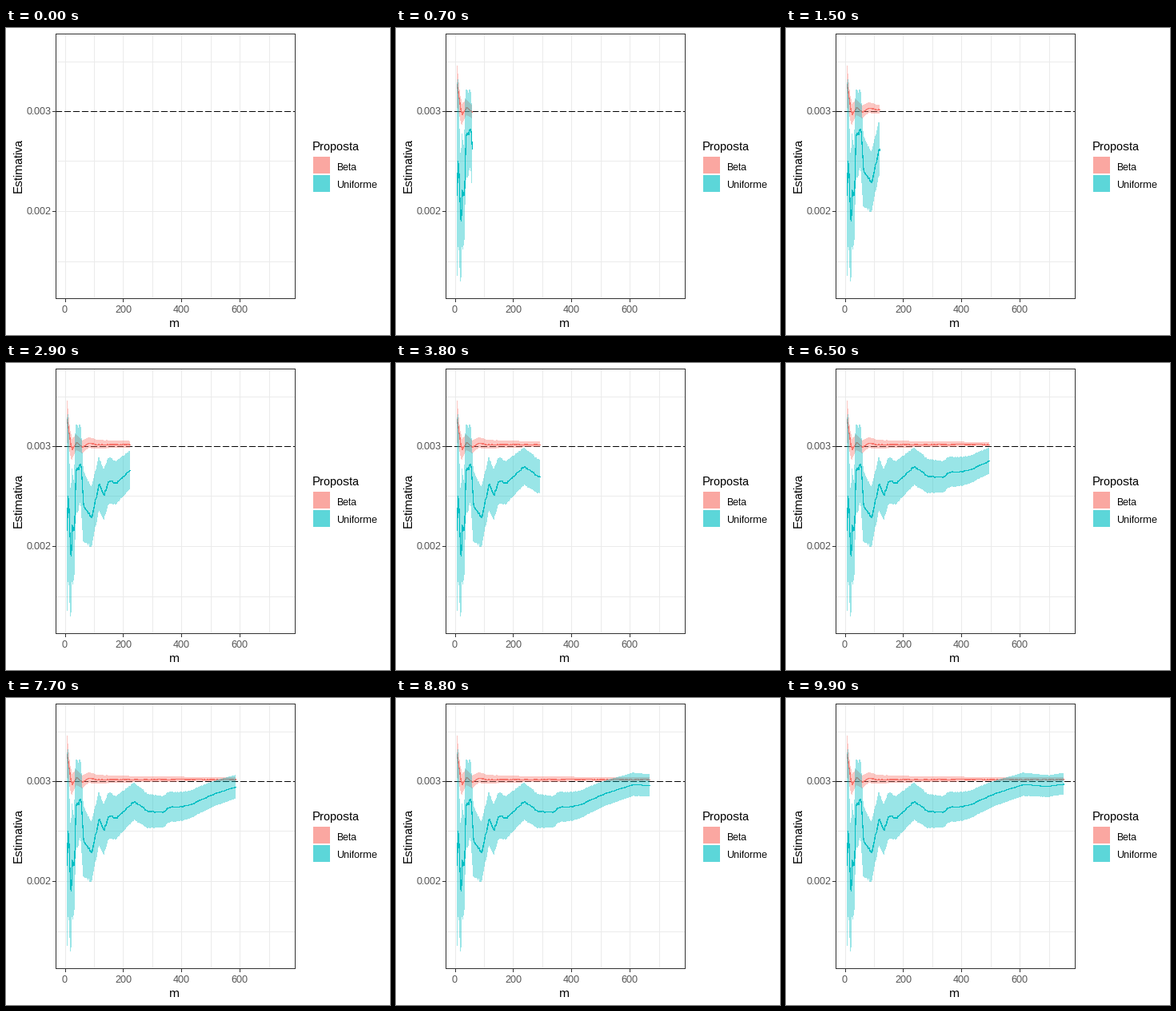
A matplotlib script for the animation above (10000 ms loop, 480 by 384 pixels).

```python
import numpy as np
import matplotlib.pyplot as plt
from matplotlib.animation import FuncAnimation
from matplotlib.patches import Rectangle

W, H, DPI = 480, 384, 100
PX = 72 / DPI                      # one pixel in points
FRAMES, INTERVAL = 100, 100
LEFT, RIGHT, TOP, BOTTOM = 62, 361, 7, 338
X0, X_UNIT = 73.5, 0.3645          # pixel position of m = 0, pixels per unit
RED, TEAL = "#F8766D", "#00BFC4"
GRID, DARK, GREY = "#EBEBEB", "#333333", "#4D4D4D"

plt.rcParams.update({"font.family": "Liberation Sans",
                     "text.hinting": "native", "text.hinting_factor": 1})
fig = plt.figure(figsize=(W / DPI, H / DPI), dpi=DPI, facecolor="white")
ax = fig.add_axes([0, 0, 1, 1])
ax.set_xlim(0, W)
ax.set_ylim(H, 0)
ax.axis("off")


def to_x(m):
    return X0 + X_UNIT * m


def to_y(value):
    return 104 + (0.003 - value) * 125000


def stroke(xs, ys, color, z, width=1, **kw):
    return ax.plot(xs, ys, color=color, lw=width * PX, zorder=z,
                   solid_capstyle="butt", dash_capstyle="butt",
                   antialiased=False, **kw)[0]


def label(x, y, text, size=12, color="black", va="baseline", **kw):
    ax.text(x, y, text, fontsize=size * PX, color=color, va=va, **kw)


# Panel
for m in range(0, 701, 100):
    x = round(to_x(m))
    stroke([x, x], [TOP, BOTTOM], GRID, 0)
for v in np.arange(0.0015, 0.0036, 0.0005):
    y = round(to_y(v))
    stroke([LEFT, RIGHT], [y, y], GRID, 0)
stroke([LEFT, RIGHT], [104, 104], "black", 1, dashes=(7, 3))
ax.add_patch(Rectangle((LEFT, TOP), RIGHT - LEFT, BOTTOM - TOP, fill=False,
                       ec=DARK, lw=PX, zorder=8, antialiased=False))

# Axes
for m in range(0, 601, 200):
    x = round(to_x(m))
    stroke([x, x], [BOTTOM, BOTTOM + 4], DARK, 8)
    label(to_x(m), 356, str(m), color=GREY, ha="center")
for v in (0.002, 0.003):
    y = round(to_y(v))
    stroke([LEFT - 4, LEFT], [y, y], DARK, 8)
    label(56.5, y + 4, f"{v:.3f}", color=GREY, ha="right")
label(210, 374.5, "m", 15, ha="center")
label(15.5, 171.5, "Estimativa", 15, rotation=90, ha="center", va="center")

# Legend
label(383, 153.5, "Proposta", 15)
for y, name, color in ((161, "Beta", RED), (184, "Uniforme", TEAL)):
    ax.add_patch(Rectangle((384, y), 21, 21, fc=color, lw=0, alpha=0.64,
                           antialiased=False))
    label(413, y + 16.5, name)

# Turning points of the running means, in pixels
BETA = [(76, 70), (79, 92), (82, 108), (88, 99), (95, 105), (103, 99.5),
        (112, 101.5), (348, 101.5)]
UNIFORM = [(76, 207), (77, 165), (81, 246), (82, 203), (85, 212), (87, 132),
           (93, 126), (97, 181), (107, 192), (116, 150), (122, 166),
           (128, 148), (137, 150), (160, 129), (178, 142), (197, 142),
           (202, 137), (228, 134), (261, 119), (296, 108), (328, 110),
           (348, 107)]

ms = np.arange(7, 751)
xs = to_x(ms)
rng = np.random.default_rng(4)


def running_mean(turns, noise):
    """Path through the turns with a wobble that dies away like 1/m."""
    decay = 0.8 ** np.arange(20)
    wobble = np.convolve(rng.normal(0, 0.6, len(ms)), decay)[:len(ms)]
    return np.interp(xs, *np.array(turns).T) + noise * wobble / (ms + 10)


class Series:
    """A running mean with its confidence band, on whole pixels."""

    def __init__(self, mid, half, color, z):
        self.x = np.round(xs)
        self.mid = np.round(mid)
        self.low, self.high = np.round(mid - half), np.round(mid + half)
        self.band = ax.fill([], [], fc=color, alpha=0.4, lw=0, zorder=z,
                            antialiased=False)[0]
        self.line = stroke([], [], color, z + 1, 0.5, snap=False)

    def reveal(self, n):
        x = self.x[:n]
        edge = np.r_[self.low[:n], self.high[:n][::-1]]
        self.band.set_xy(np.c_[np.r_[x, x[::-1]], edge])
        self.line.set_data(x + 0.5, self.mid[:n] + 0.5)


series = [
    Series(running_mean(BETA, 15), 60 / np.sqrt(ms - 2.5), RED, 2),
    Series(running_mean(UNIFORM, 120), 360 / np.sqrt(ms + 2.5), TEAL, 4),
]


def update(i):
    n = round(len(ms) * i / (FRAMES - 1))
    for s in series:
        s.reveal(n)
    return [a for s in series for a in (s.band, s.line)]


anim = FuncAnimation(fig, update, frames=FRAMES, interval=INTERVAL,
                     repeat=True, repeat_delay=0, blit=False)
plt.show()
```
